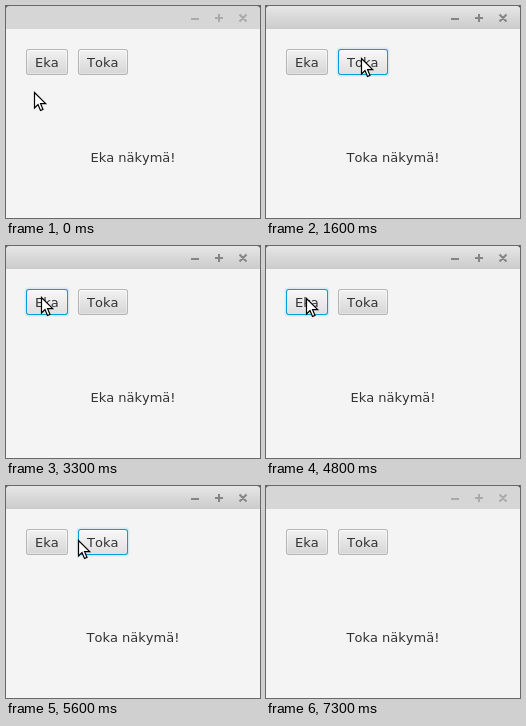
Animation of 254x212 px, one loop 7600 ms. Source, as an HTML page:

```html
<!DOCTYPE html>
<html lang="fi">
<head>
<meta charset="utf-8">
<title>Kaksi näkymää</title>
<style>
  html, body { margin: 0; width: 100%; height: 100%; overflow: hidden; background: #f4f4f4; }
  svg { display: block; width: 100%; height: 100%; }
  text { font: 13px "DejaVu Sans", sans-serif; font-kerning: none; fill: #333; }
  .halo, .focused .border { fill: #039ed3; }
  .halo { opacity: 0; }
  .focused .halo { opacity: .13; }
  .border { fill: #b5b5b5; }
  .body { fill: url(#normal); }
  .hover .body { fill: url(#light); }
  .armed .body { fill: url(#pressed); }
  #bar { fill: #d6d6d6; }
  #icons { fill: none; stroke: #aaa; stroke-width: 2; }
  .active #bar { fill: url(#title); }
  .active #icons { stroke: #858585; }
  #cursor { fill: #fff; stroke: #000; stroke-width: 1.2; }
  #cursor.dark { fill: #444; stroke: #eee; stroke-width: .8; }
</style>
</head>
<body>
<svg id="stage" viewBox="0 0 254 212">
  <defs>
    <linearGradient id="title" x2="0" y2="1"><stop stop-color="#e6e6e6"/><stop offset="1" stop-color="#cbcbcb"/></linearGradient>
    <linearGradient id="rim" x2="0" y2="1"><stop stop-color="#fcfcfc"/><stop offset="1" stop-color="#e2e2e2"/></linearGradient>
    <linearGradient id="normal" x2="0" y2="1"><stop stop-color="#f0f0f0"/><stop offset="1" stop-color="#d7d7d7"/></linearGradient>
    <linearGradient id="light" x2="0" y2="1"><stop stop-color="#f7f7f7"/><stop offset="1" stop-color="#e0e0e0"/></linearGradient>
    <linearGradient id="pressed" x2="0" y2="1"><stop stop-color="#dedede"/><stop offset="1" stop-color="#c8c8c8"/></linearGradient>
  </defs>
  <rect width="254" height="212" fill="#f4f4f4"/>
  <path fill="#444" d="M0 0H4V4H0ZM250 0H254V4H250Z"/>
  <path id="bar" d="M0 23V3Q0 0 3 0H251Q254 0 254 3V23Z"/>
  <path id="icons" d="M185 13H193M209 12H217M213 8V16M233.5 8.5L240.5 15.5M240.5 8.5L233.5 15.5"/>
  <g id="buttons"></g>
  <text id="label" x="127" y="156" text-anchor="middle"></text>
  <path id="cursor" d="M.5 .5V16L4 12.6L6.5 18.5L9 17.4L6.6 11.7H11.7Z"/>
</svg>
<script>
const LOOP = 7600, STEP = 100;
const byId = id => document.getElementById(id);
const stage = byId("stage"), label = byId("label"), cursor = byId("cursor");

// time, x, y of the pointer tip
const path = [
  [100, 28, 86], [400, 42, 66], [600, 65, 55], [900, 95, 52],
  [2200, 95, 52], [2600, 35, 51], [4700, 35, 51], [4800, 40, 52],
  [5300, 72, 54], [6000, 72, 54], [6600, 133, 19], [6800, 127, -4],
  [7000, 125, -14], [7100, 125, -30]
];
const clicks = [
  { down: 1600, up: 1600, name: "Toka" },
  { down: 3200, up: 3300, name: "Eka" },
  { down: 5500, up: 5600, name: "Toka" }
];
const BLUR = 7300;

function makeButton(name, x, width) {
  const group = document.createElementNS("http://www.w3.org/2000/svg", "g");
  const box = (inset, radius, attrs) =>
    `<rect x="${x + inset}" y="${43 + inset}" width="${width - 2 * inset}" height="${26 - 2 * inset}" rx="${radius}" ${attrs}/>`;
  group.innerHTML =
    box(-1.4, 4, 'class="halo"') + box(0, 3, 'class="border"') +
    box(1, 2, 'fill="url(#rim)"') + box(2, 1, 'class="body"') +
    `<text x="${x + 9}" y="61">${name}</text>`;
  byId("buttons").append(group);
  return { name, x, width, group };
}
const buttons = [makeButton("Eka", 20, 42), makeButton("Toka", 72, 50)];

function pointerAt(t) {
  const next = path.findIndex(p => p[0] > t);
  if (next === 0) return path[0].slice(1);
  if (next < 0) return path.at(-1).slice(1);
  const [t0, x0, y0] = path[next - 1], [t1, x1, y1] = path[next];
  const k = (t - t0) / (t1 - t0);
  return [Math.round(x0 + (x1 - x0) * k), Math.round(y0 + (y1 - y0) * k)];
}

function draw(now) {
  const t = Math.floor(now % LOOP / STEP) * STEP;
  const [px, py] = pointerAt(t);
  const pressed = clicks.findLast(c => c.down <= t);
  const shown = clicks.findLast(c => c.up <= t);
  const active = !!pressed && t < BLUR;

  stage.classList.toggle("active", active);
  label.textContent = `${shown ? shown.name : "Eka"} näkymä!`;
  for (const { name, x, width, group } of buttons) {
    const focused = active && pressed.name === name;
    group.classList.toggle("focused", focused);
    group.classList.toggle("armed", focused && t < pressed.up);
    group.classList.toggle("hover", px >= x && px < x + width && py >= 43 && py < 69);
  }
  cursor.setAttribute("transform", `translate(${px} ${py})`);
  cursor.classList.toggle("dark", py < 23);
}

const start = performance.now();
function tick() {
  draw(performance.now() - start);
  requestAnimationFrame(tick);
}
tick();
</script>
</body>
</html>
```
